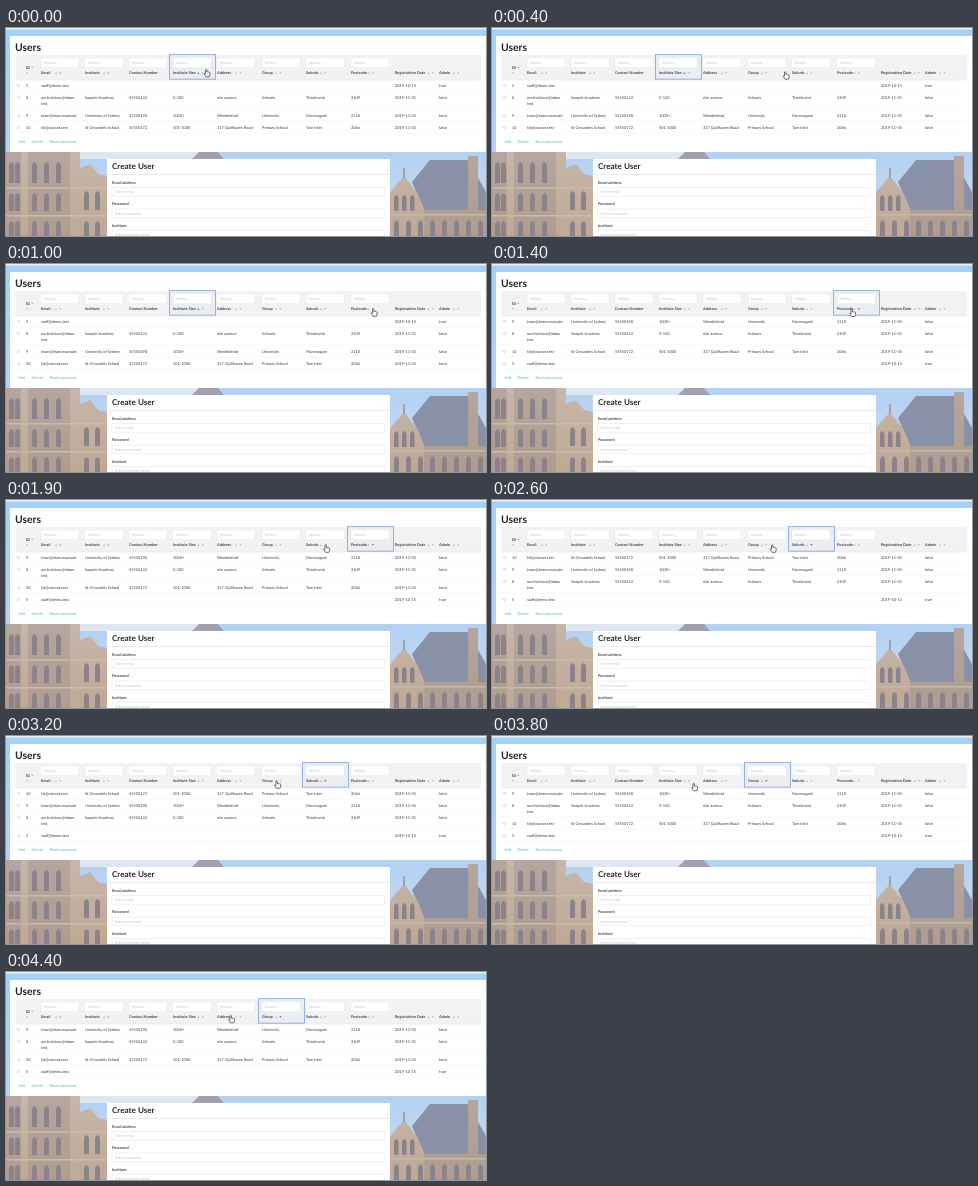
These frames come from a looping animation (480 by 208 pixels, 4.5 s). An HTML page with a canvas:

```html
<!DOCTYPE html>
<html lang="en">
<head>
<meta charset="utf-8">
<title>Users</title>
<style>
html, body { margin: 0; width: 100%; height: 100%; overflow: hidden; background: #b3cdef; }
canvas, svg { position: absolute; left: 0; top: 0; width: 100vw; height: 100vh; display: block; }
text { font: 400 3.9px Lato, "Open Sans", sans-serif; fill: #3a3a3e; text-rendering: geometricPrecision; }
.bold { font-weight: 700; fill: #48484d; }
.hint { fill: #c6c6ca; }
.link { fill: #5db5ac; }
.h1 { font-weight: 700; font-size: 10.4px; fill: #222225; }
.h2 { font-weight: 700; font-size: 8.1px; fill: #2b2b2e; }
</style>
</head>
<body>
<canvas id="photo" width="480" height="208"></canvas>
<svg id="ui" viewBox="0 0 480 208" preserveAspectRatio="none"></svg>
<script>
const LOOP = 4500, STEP = 100;
const ui = document.getElementById('ui');

function add(tag, attrs, parent = ui) {
  const el = document.createElementNS('http://www.w3.org/2000/svg', tag);
  for (const k in attrs) el.setAttribute(k, attrs[k]);
  parent.append(el);
  return el;
}
function label(str, x, y, cls = '', parent = ui) {
  const el = add('text', { x, y, class: cls }, parent);
  el.textContent = str;
  return el;
}
function box(x, y, width, height, fill, stroke = 'none', parent = ui) {
  return add('rect', { x, y, width, height, fill, stroke, 'stroke-width': 0.4 }, parent);
}

// Soft impression of a sandstone building with a slate roof under a pale sky
function drawPhoto() {
  const c = document.getElementById('photo').getContext('2d');
  const rect = (x, y, w, h, fill) => { c.fillStyle = fill; c.fillRect(x, y, w, h); };
  const poly = (fill, ...p) => {
    c.fillStyle = fill;
    c.beginPath();
    for (let i = 0; i < p.length; i += 2) c.lineTo(p[i], p[i + 1]);
    c.fill();
  };
  const arch = (x, y, w, h) => {
    c.fillStyle = '#8b8389';
    c.beginPath();
    c.moveTo(x, y + h);
    c.lineTo(x, y + w / 2);
    c.quadraticCurveTo(x, y, x + w / 2, y - 1);
    c.quadraticCurveTo(x + w, y, x + w, y + w / 2);
    c.lineTo(x + w, y + h);
    c.fill();
  };
  const shade = (top, bottom) => {
    const g = c.createLinearGradient(0, 124, 0, 208);
    g.addColorStop(0, top);
    g.addColorStop(1, bottom);
    return g;
  };
  const sky = c.createLinearGradient(0, 0, 0, 208);
  sky.addColorStop(0, '#a3d1f8');
  sky.addColorStop(0.6, '#b3d1f3');
  sky.addColorStop(1, '#cfdcee');
  rect(0, 0, 480, 208, sky);
  rect(0, 0, 480, 1.5, '#e8f0f8');
  poly('#dde6f1', 74, 124, 200, 124, 190, 131, 74, 131);
  poly('#a3a0ad', 186, 131, 193, 124, 212, 124, 218, 131);

  const stone = shade('#b5a69f', '#b09c8f');
  const lit = shade('#c6b6aa', '#bfa995');
  rect(0, 124, 74, 84, stone);
  poly(lit, 74, 208, 74, 140, 84, 136, 92, 146, 101, 148, 101, 208);
  rect(15, 124, 7, 84, lit);
  rect(64, 124, 10, 84, lit);
  rect(0, 159, 101, 1.5, '#cbbbad');
  rect(0, 187, 101, 1.5, '#cbbbad');
  for (const x of [3, 9, 26, 38, 50]) {
    arch(x, 135, 5, 20);
    arch(x, 166, 5, 17);
    arch(x, 194, 5, 14);
  }
  for (const x of [78, 89]) {
    arch(x, 164, 5, 18);
    arch(x, 194, 5, 14);
  }

  poly('#8991a7', 406, 154, 424, 132, 462, 132, 480, 164, 480, 186, 420, 186);
  poly(lit, 384, 208, 384, 164, 398, 148, 412, 166, 420, 186, 420, 208);
  rect(397, 140, 2, 10, '#a4a0a9');
  rect(418, 182, 62, 26, stone);
  rect(462, 128, 10, 80, stone);
  rect(384, 186, 96, 1.5, '#c8b8ab');
  for (const x of [388, 396, 404]) arch(x, 168, 4.5, 15);
  for (let x = 388; x < 476; x += 12) arch(x, 193, 5, 15);
}

// title, x, x of the sort arrows
const columns = [
  ['Email', 35, 49], ['Institute', 79, 97], ['Contact Number', 123, 0],
  ['Institute Size', 167, 191.5], ['Address', 211, 229], ['Group', 256, 269],
  ['Suburb', 300, 314], ['Postcode', 345, 361.5], ['Registration Date', 389, 421.5], ['Admin', 433, 447]
];
const users = {
  5: ['staff@demo.test', '', '', '', '', '', '', '', '2019-10-15', 'true'],
  8: ['ourtrialclass@inbox.', 'Sample Academy', '55550143', '0-100', 'elm avenue', 'Schools', 'Thistlewick', '2109', '2019-11-01', 'false'],
  9: ['team@team.example', 'University of Sydney', '55550198', '1000+', 'Wembleford', 'University', 'Marrowgate', '2118', '2019-11-05', 'false'],
  10: ['kit@classes.test', 'St Orvandels School', '55550172', '501-1000', '317 Quillhaven Road', 'Primary School', 'Tarn Inlet', '2066', '2019-11-05', 'false']
};
// start time, sorted column, row order, descending
const sorts = [
  [0, 3, [5, 8, 9, 10], false],
  [1100, 7, [9, 8, 10, 5], true],
  [2200, 6, [10, 9, 8, 5], true],
  [3300, 5, [9, 8, 10, 5], true]
];
// time, x, y of the pointer's middle
const moves = [
  [0, 201, 45], [100, 208, 45.5], [300, 268, 47], [600, 346, 48], [900, 368, 48.5],
  [1300, 368, 48.5], [1500, 353, 49], [1700, 328, 48.5], [1900, 320.5, 48.5],
  [2300, 320.5, 48.5], [2400, 311, 48.5], [2500, 294, 48.5], [2600, 281, 48.5],
  [2900, 272.5, 48], [3200, 271.5, 48.5],
  [3600, 271.5, 48.5], [3700, 236, 50], [3800, 202.5, 51], [3900, 187, 51],
  [4000, 183.5, 50.5], [4200, 194, 49.5], [4300, 214, 48], [4400, 225.5, 47]
];

function arrow(x, y, up, dark, parent) {
  const d = up ? -1 : 1;
  add('path', {
    d: `M${x} ${y - 0.7 * d}h2l-1 ${1.4 * d}z`,
    fill: dark ? '#44444a' : '#a3a3aa'
  }, parent);
}

function drawPanels() {
  box(4, 8, 476, 116, '#fff');
  label('Users', 9, 23, 'h1');
  box(9, 27, 466, 25, '#f2f2f4');
  add('path', { d: 'M9 52H475', stroke: '#e2e2e5', 'stroke-width': 0.5 });
  label('Edit', 12.5, 115.3, 'link');
  label('Delete', 25.5, 115.3, 'link');
  label('Reset password', 43.5, 115.3, 'link');

  box(101, 131, 283, 77, '#fff');
  label('Create User', 106, 141.1, 'h2');
  add('path', { d: 'M101 146.5H384', stroke: '#e0e0e3', 'stroke-width': 0.7 });
  const fields = [['Email address', 'Enter email'], ['Password', 'Enter password'], ['Institute', 'Enter institute name']];
  fields.forEach(([name, hint], i) => {
    const y = 155.9 + i * 21.3;
    label(name, 106, y, 'bold');
    box(106, y + 3.8, 272.5, 8.4, '#fff', '#d9d9dd');
    label(hint, 109, y + 9.3, 'hint');
  });
}

function drawTable([, sorted, order, desc]) {
  table.replaceChildren();
  const edge = columns[sorted][1] - 3.5;
  box(edge, 27, 46, 24.5, '#ebedf1', 'none', table);
  label('ID', 20, 40.6, 'bold', table);
  arrow(25.2, 39.2, true, false, table);
  arrow(20.2, 45, false, false, table);
  columns.forEach(([name, x, ax], i) => {
    if (i < 8) {
      box(x, 30, 38, 9.6, '#fff', '#e6e6e9', table);
      label('Search...', x + 2.7, 36.1, 'hint', table);
    }
    label(name, x, 46.4, 'bold', table);
    if (ax) {
      arrow(ax, 45, true, i === sorted && !desc, table);
      arrow(ax + 4.4, 45, false, i === sorted && desc, table);
    }
  });
  add('rect', {
    x: edge, y: 26.6, width: 46, height: 24.6,
    fill: 'none', stroke: '#94b1dd', 'stroke-width': 1
  }, table);

  let y = 58.5;
  for (const id of order) {
    add('circle', { cx: 12.5, cy: y - 1, r: 1.1, fill: '#fff', stroke: '#b5b5ba', 'stroke-width': 0.5 }, table);
    label(id, 20, y, '', table);
    users[id].forEach((cell, i) => cell && label(cell, columns[i][1], y, '', table));
    if (id === 8) label('test', 35, y += 6, '', table);
    y += 12;
    add('path', { d: `M9 ${y - 7.4}H475`, stroke: '#ececef', 'stroke-width': 0.4 }, table);
  }
}

function pointerAt(t) {
  let i = moves.length - 1;
  while (moves[i][0] > t) i--;
  const a = moves[i], b = moves[i + 1] || a;
  const k = b === a ? 0 : (t - a[0]) / (b[0] - a[0]);
  return [a[1] + (b[1] - a[1]) * k, a[2] + (b[2] - a[2]) * k];
}

drawPhoto();
drawPanels();
const table = add('g', {});
const hand = add('path', {
  d: 'M-1.5 .7V-3.2q.7-1.1 1.4 0V-.9q.7-.6 1.1.1q.8-.5 1.1.2q.9-.3 1 .6V1.8L2.4 3.8H-1L-2.9.9q0-1 1.4-.2z',
  fill: '#fff', stroke: '#333338', 'stroke-width': 0.7, 'stroke-linejoin': 'round'
});

let shown = null;
function frame(now) {
  const t = Math.floor((now % LOOP) / STEP) * STEP;
  const state = sorts.filter(s => s[0] <= t).pop();
  if (state !== shown) drawTable(shown = state);
  hand.setAttribute('transform', `translate(${pointerAt(t).join(' ')})`);
}
const start = performance.now();
function tick() {
  frame(performance.now() - start);
  requestAnimationFrame(tick);
}
tick();
</script>
</body>
</html>
```
